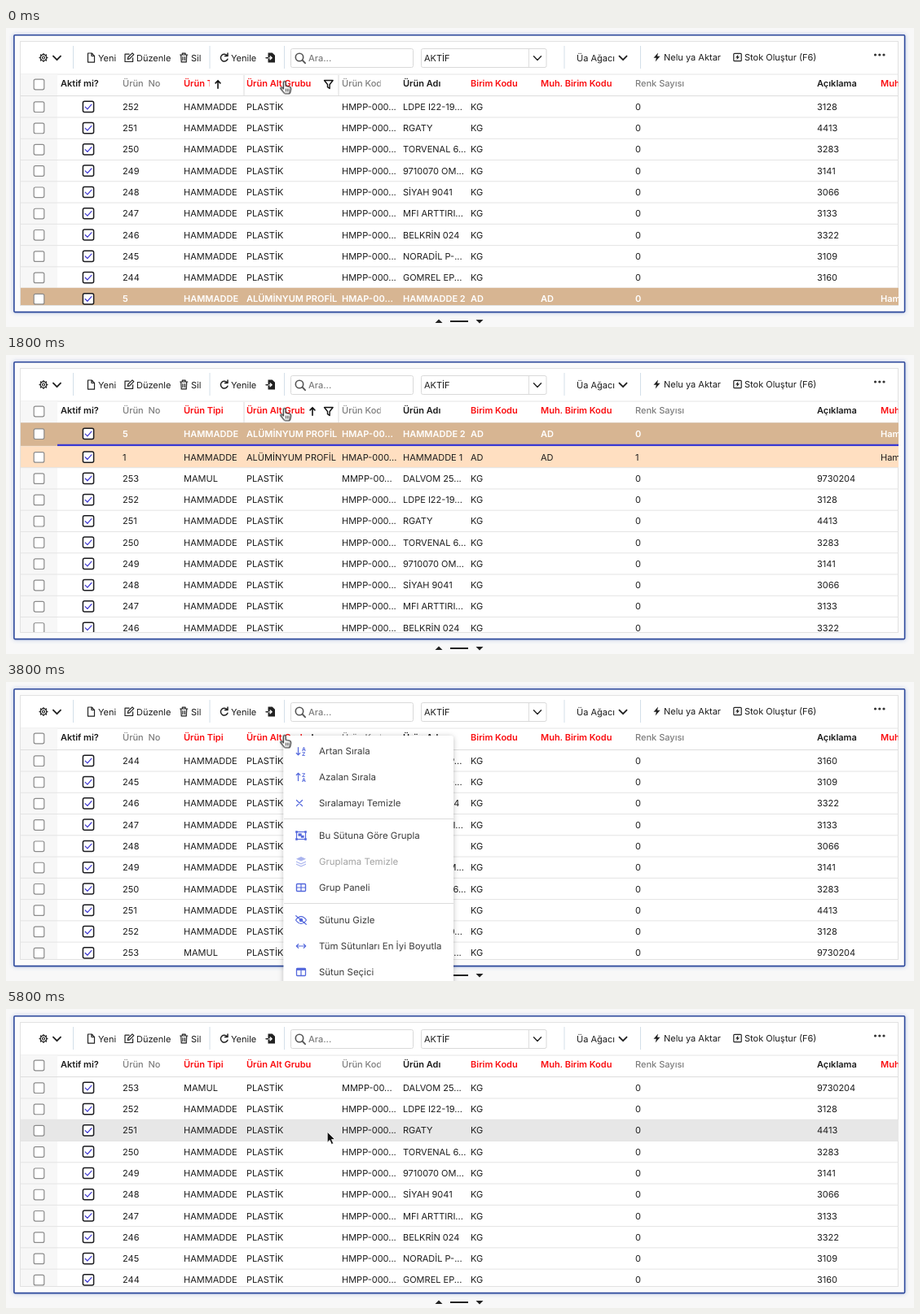
Recreate the animation shown at these times as an HTML page. Size 1114 by 368 pixels, loop 6 s.

```html
<!DOCTYPE html>
<html lang="tr">
<head>
<meta charset="utf-8">
<title>Ürün listesi</title>
<style>
html, body { margin: 0; width: 100%; height: 100%; overflow: hidden; background: #f8f8f8; }
svg { display: block; width: 1114px; height: 368px; }
text { font: 400 11px Inter, Roboto, sans-serif; fill: #1c1c1c; white-space: pre; text-rendering: geometricPrecision; }
.bold { font-weight: 600; }
.red { fill: #fa0d10; font-weight: 600; }
.gray { fill: #7d7d7d; font-weight: 500; }
.picked { fill: #fff; font-weight: 600; }
.menu text { font-size: 11.45px; fill: #3c3c3c; }
.menu text.off { fill: #a3a3a3; }
.ink { fill: none; stroke: #222; stroke-width: 1.2; stroke-linecap: round; stroke-linejoin: round; }
.blue { fill: none; stroke: #5468dc; stroke-width: 1.2; stroke-linecap: round; stroke-linejoin: round; }
.anim { animation: 6s step-end infinite; opacity: 0; }
#byType { animation-name: byType; }
#rising { animation-name: rising; }
#falling { animation-name: falling; }
#plain { animation-name: plain; }
#headHover { animation-name: headHover; }
#menu { animation-name: menu; }
#rowHover, #arrow { animation-name: after; }
#hand { animation-name: hand; }
@keyframes byType { 0% { opacity: 1 } 6.666%, 100% { opacity: 0 } }
@keyframes rising { 0% { opacity: 0 } 6.666% { opacity: 1 } 36.666%, 100% { opacity: 0 } }
@keyframes falling { 0% { opacity: 0 } 36.666% { opacity: 1 } 90%, 100% { opacity: 0 } }
@keyframes plain { 0% { opacity: 0 } 90%, 100% { opacity: 1 } }
@keyframes headHover { 0% { opacity: 1 } 60%, 100% { opacity: 0 } }
@keyframes menu { 0% { opacity: 0 } 60% { opacity: 1 } 86.666%, 100% { opacity: 0 } }
@keyframes after { 0% { opacity: 0 } 86.666%, 100% { opacity: 1 } }
@keyframes hand {
  0% { opacity: 1; transform: translate(341.7px, 65.5px) }
  70% { opacity: 1; transform: translate(342px, 84px) }
  73.333% { opacity: 1; transform: translate(367px, 135px) }
  76.666% { opacity: 1; transform: translate(391.5px, 149.5px) }
  83.333% { opacity: 1; transform: translate(394.5px, 152.5px) }
  86.666%, 100% { opacity: 0; transform: translate(394.5px, 152.5px) }
}
</style>
</head>
<body>
<svg id="stage" viewBox="0 0 1114 368"></svg>
<script>
const text = (x, mid, s, cls = '') => `<text x="${x}" y="${mid + 4}" class="${cls}">${s}</text>`;
const rect = (x, y, w, h, fill, extra = '') => `<rect x="${x}" y="${y}" width="${w}" height="${h}" fill="${fill}" ${extra}/>`;
const path = (d, cls = 'ink', extra = '') => `<path d="${d}" class="${cls}" ${extra}/>`;
const solid = (d, fill = '#222') => `<path d="${d}" fill="${fill}"/>`;
const at = (x, y, body) => `<g transform="translate(${x} ${y})">${body}</g>`;
const group = (id, body) => `<g id="${id}" class="anim">${body}</g>`;
const chevron = (x, y, w = 1.9) => path(`M${x - 4.5} ${y - 2.2}l4.5 4.6 4.5-4.6`, 'ink', `style="stroke-width:${w}"`);
const bolt = 'M1.5-5.5L-4 .8H-.7L-1.8 5.5 4-1.2H.6Z';

// Table
const TOP = 83.7, PITCH = 26.27, HEAD = 67.6;
const stock = [
  [253, 'DALVOM 25...', 9730204], [252, 'LDPE I22-19...', 3128], [251, 'RGATY', 4413],
  [250, 'TORVENAL 6...', 3283], [249, '9710070 OM...', 3141], [248, 'SİYAH 9041', 3066],
  [247, 'MFI ARTTIRI...', 3133], [246, 'BELKRİN 024', 3322], [245, 'NORADİL P-...', 3109],
  [244, 'GOMREL EP...', 3160]
].map(([no, name, note]) => ({
  no, name, note, type: no === 253 ? 'MAMUL' : 'HAMMADDE', sub: 'PLASTİK',
  code: no === 253 ? 'MMPP-00...' : 'HMPP-000...', unit: 'KG', unit2: '', colors: 0, last: ''
}));
const profile = (no, code, name, colors) => ({
  no, code, name, colors, note: '', type: 'HAMMADDE', sub: 'ALÜMİNYUM PROFİL', unit: 'AD', unit2: 'AD', last: 'Hammadde'
});
const five = profile(5, 'HMAP-00...', 'HAMMADDE 2', 0);
const one = profile(1, 'HMAP-000...', 'HAMMADDE 1', 1);
const columns = { no: 143, type: 218, sub: 295, code: 412, name: 487, unit: 570, unit2: 656, colors: 772, note: 995, last: 1073 };

const box = (x, y) => rect(x - 6.3, y - 6.3, 12.6, 12.6, '#fff', 'rx="2" stroke="#8b8b8b" stroke-width="1.2"');
const tick = (x, y) => rect(x - 6.6, y - 6.6, 13.2, 13.2, '#fff', 'rx="2" stroke="#1b1b1f" stroke-width="1.5"')
  + path(`M${x - 3.8} ${y + .2}l2.7 2.7 5-5.6`, 'ink', 'style="stroke:#3c35cf"');

function row(item, i, shift) {
  const y = TOP + PITCH * i + (i ? shift : 0), mid = y + 13.2;
  const h = PITCH + (i ? 0 : shift);
  let out = '';
  if (item === five) out += rect(18, y - .3, 1077, h + .3, '#d7b592');
  else if (item === one) out += rect(18, y, 1077, h, '#ffdfc1');
  out += rect(18, y + h - .5, 1077, 1, '#e4e4e4');
  if (item === five && shift) out += rect(63, y + h - 2.6, 1032, 2.4, '#3a39d2');
  out += box(40.5, mid + .3) + tick(101, mid);
  for (const key in columns) out += text(columns[key], mid, item[key], item === five ? 'picked' : '');
  return out;
}
const rows = (list, shift = 0) => list.map((item, i) => row(item, i, shift)).join('');

const sortArrow = (x, dir) => at(x, 69.5, `<g transform="scale(1 ${dir})">`
  + path('M0 4.8V-4.2M-2.9-1.6L0-4.8 2.9-1.6', 'ink', 'style="stroke:#111;stroke-width:1.6"') + '</g>');
// A sorted heading is cut short to make room for its arrow.
const heading = (x, edge, s, dir) => dir
  ? `<g clip-path="url(#cut${edge})">${text(x, HEAD, s, 'red')}</g>` + sortArrow(edge - 32, dir)
  : text(x, HEAD, s, 'red');
const view = (id, list, typeDir, subDir, shift) => group(id,
  rows(list, shift) + heading(218, 292, 'Ürün Tipi', typeDir) + heading(295, 408, 'Ürün Alt Grubu', subDir));

const fixedHeads = box(40.5, 69.5)
  + text(67, HEAD, 'Aktif mi?', 'bold') + text(143, HEAD, 'Ürün  No', 'gray')
  + `<g clip-path="url(#cutCode)">${text(412, HEAD, 'Ürün Kodu', 'gray')}</g>`
  + text(487, HEAD, 'Ürün Adı', 'bold') + text(570, HEAD, 'Birim Kodu', 'red')
  + text(656, HEAD, 'Muh. Birim Kodu', 'red') + text(772, HEAD, 'Renk Sayısı', 'gray')
  + text(995, HEAD, 'Açıklama', 'bold') + text(1073, HEAD, 'Muh. Kodu', 'red');

const headHover = group('headHover', rect(291.5, 58, 1, 25, '#dcdcdc') + rect(407.5, 58, 1, 25, '#dcdcdc')
  + path('M390.5 64.5h10.6l-4 5v5l-2.6-1.8v-3.2z', 'ink', 'style="stroke:#111;stroke-width:1.4"'));

// Toolbar
const teeth = Array.from({ length: 8 }, (_, i) => `<path d="M0-4V-4.8" class="ink" style="stroke-width:1.5" transform="rotate(${i * 45})"/>`).join('');
const toolbar = [82, 249.5, 341, 684.5, 778].map(x => rect(x, 22, 1, 28, '#d3dfe9')).join('')
  + at(46, 36.5, `<circle r="3.8" class="ink"/><circle r="1.5" class="ink"/>${teeth}`)
  + chevron(62.5, 36.8)
  + path('M100.5 31h4.7l3.3 3.3v7.8h-8zM105 31v3.5h3.5') + text(113, 36.5, 'Yeni')
  + path('M151 32.2h-5v9.3h9.6v-4.6M149.3 38.3l.5-2.3 5.2-5.2 1.8 1.8-5.2 5.2z') + text(160, 36.5, 'Düzenle')
  + path('M213.6 33h9.2M216.3 32.8v-1.7h3.8v1.7M214.7 33.3l.5 8.6h6l.5-8.6M217 35.5v4M219.4 35.5v4') + text(227, 36.5, 'Sil')
  + path('M271.5 34.2a4.4 4.4 0 1 0 .4 4M272 31v3.5h-3.5', 'ink', 'style="stroke-width:1.5"') + text(276, 36.5, 'Yenile')
  + solid('M321.5 30.5h5.2l3.3 3.3v8.6h-8.5z') + path('M319.5 36.8h6.5M324 34.8l2.2 2-2.2 2', 'ink', 'style="stroke:#fff;stroke-width:1.2"')
  + path('M319 36.8h2.5', 'ink', 'style="stroke-width:1.4"')
  + rect(349.5, 25.5, 150, 23, '#fff', 'rx="2" stroke="#d9d9d9"')
  + '<circle cx="360" cy="36" r="4.7" class="ink" style="stroke:#555;stroke-width:1.6"/>'
  + path('M363.6 39.6l3.4 3.6', 'ink', 'style="stroke:#555;stroke-width:1.9"')
  + text(371, 36.5, 'Ara...', 'gray')
  + rect(509.5, 25.5, 153.5, 23, '#fff', 'rx="2" stroke="#d9d9d9"') + rect(641, 26, 1, 22, '#dedede')
  + text(513, 36.5, 'AKTİF') + chevron(652, 37, 1.4)
  + text(700, 36.5, 'Üa Ağacı') + chevron(757, 36.8)
  + at(798.5, 36, solid(bolt)) + text(807, 36.3, 'Nelu ya Aktar')
  + at(897.5, 36, rect(-4.7, -4.7, 9.4, 9.4, 'none', 'rx="1" stroke="#222" stroke-width="1.2"') + `<g transform="scale(.62)">${solid(bolt)}</g>`)
  + text(906, 36.3, 'Stok Oluştur (F6)')
  + [1066.5, 1071.8, 1077].map(x => `<circle cx="${x}" cy="33" r="1.6" fill="#333"/>`).join('');

// Context menu
const letter = (y, s) => `<text x="1" y="${y}" style="font-size:6.5px;font-weight:700;fill:#5468dc">${s}</text>`;
const pen = d => path(d, 'blue');
const icons = {
  down: pen('M-3.5-4.5v9M-5.7 2.5l2.2 2.3 2.2-2.3') + letter(-.5, 'A') + letter(5.5, 'Z'),
  up: pen('M-3.5 4.5v-9M-5.7-2.5l2.2-2.3 2.2 2.3') + letter(-.5, 'Z') + letter(5.5, 'A'),
  clear: pen('M-5.5-3.5l7 7M1.5-3.5l-7 7'),
  group: rect(-5.5, -4.5, 11, 9, 'none', 'stroke="#5468dc" stroke-width="1.2"')
    + [[-6.8, -5.8], [4.2, -5.8], [-6.8, 3.2], [4.2, 3.2]].map(p => rect(p[0], p[1], 2.6, 2.6, '#5468dc')).join('')
    + rect(-3.5, -2.7, 4.2, 3.4, '#5468dc') + rect(-.2, -.2, 3.8, 3, '#5468dc'),
  layers: solid('M0-6l6 2.8-6 2.8-6-2.8z', '#aab4ee') + solid('M-6-.5L0 2.3 6-.5v1.3L0 3.6-6 .8z', '#aab4ee')
    + solid('M-6 2.5L0 5.3l6-2.8v1.3L0 6.6l-6-2.8z', '#aab4ee'),
  panel: rect(-5.5, -4.5, 11, 9, 'none', 'rx="1" stroke="#5468dc" stroke-width="1.4"') + pen('M0-4.5v9M-5.5 0h11'),
  hide: pen('M-6.5 0Q-3.5-4.4 0-4.4T6.5 0Q3.5 4.4 0 4.4T-6.5 0zM-6.3-5.3L6.3 5.3') + '<circle r="2.3" fill="#5468dc"/>',
  fit: pen('M-5.5 0h11M-3.3-2.4L-5.7 0l2.4 2.4M3.3-2.4L5.7 0 3.3 2.4'),
  chooser: rect(-5.5, -4.5, 11, 9, 'none', 'rx="1" stroke="#5468dc" stroke-width="1.3"') + rect(-5.5, -4.5, 11, 2.4, '#5468dc') + pen('M0-4v8.5')
};
const items = [
  [85, 'down', 'Artan Sırala'], [117, 'up', 'Azalan Sırala'], [149, 'clear', 'Sıralamayı Temizle'],
  [189, 'group', 'Bu Sütuna Göre Grupla'], [221, 'layers', 'Gruplama Temizle'], [253, 'panel', 'Grup Paneli'],
  [293, 'hide', 'Sütunu Gizle'], [325, 'fit', 'Tüm Sütunları En İyi Boyutla'], [357, 'chooser', 'Sütun Seçici']
];
const menu = group('menu', '<g class="menu">'
  + rect(340.5, 66, 208.5, 320, '#fff', 'rx="4" filter="url(#soft)"')
  + rect(341, 168, 208, 1, '#dcdcdc') + rect(341, 272, 208, 1, '#dcdcdc')
  + items.map(([y, icon, label]) => at(362, y, icons[icon]) + text(384, y, label, icon === 'layers' ? 'off' : '')).join('')
  + '</g>');

// Pointers, with their tips at 0,0
const hand = group('hand', '<path fill="#fff" stroke="#111" stroke-width="1.1" stroke-linejoin="round" d="M-1.4 8.3V1.4a1.4 1.4 0 0 1 2.8 0V5.8l4.6 1q2 .5 1.8 2.4l-.6 3.4q-.3 2.6-2.2 2.6H1q-1.2 0-2-1.2l-3.6-4.6q-.8-1.4.6-1.9 1-.3 2.6 2z"/>'
  + path('M1.4 9.5v3M3.4 9.5v3M5.3 9.5v3', 'ink', 'style="stroke-width:.8"'));
const arrow = group('arrow', at(394.2, 151.3,
  '<path fill="#111" stroke="#fff" stroke-width=".8" d="M0 0v13l3-2.8 2.2 5 2.3-1-2.2-4.9h4.1z"/>'));

const clip = (id, x, y, w, h) => `<clipPath id="${id}">${rect(x, y, w, h, '#000')}</clipPath>`;
const defs = '<defs>'
  + clip('grid', 18, 57, 1076.5, 284) + clip('cut292', 200, 57, 50, 26)
  + clip('cut408', 280, 57, 86, 26) + clip('cutCode', 400, 57, 59.5, 26)
  + '<filter id="soft" x="-10%" y="-10%" width="120%" height="120%"><feDropShadow dx="0" dy="1" stdDeviation="3" flood-color="#000" flood-opacity=".25"/></filter>'
  + '<filter id="glow" x="-2%" y="-5%" width="104%" height="110%"><feDropShadow dx="0" dy="0" stdDeviation="2.5" flood-color="#4a68c0" flood-opacity=".42"/></filter>'
  + '</defs>';

const newest = stock, oldest = [...stock].reverse();
document.getElementById('stage').innerHTML = defs
  + rect(9.9, 8.8, 1092.7, 340.8, '#fbfbfb', 'rx="1" stroke="#2f4a9c" stroke-width="1.6" filter="url(#glow)"')
  + rect(17.5, 16.5, 1077, 325, '#fff', 'stroke="#e2e2e2"')
  + toolbar + rect(18, 56.5, 1076, 1, '#e6e6e6')
  + '<g clip-path="url(#grid)">'
  + rect(18, 57, 45, 285, '#f7f7f7') + rect(18, 83, 1077, 1, '#dedede')
  + group('rowHover', rect(18, TOP + 2 * PITCH, 1077, PITCH, '#e7e7e7'))
  + fixedHeads
  + view('byType', [...newest.slice(1), five], 1, 0, 0)
  + view('rising', [five, one, ...newest.slice(0, 8)], 0, 1, 2.4)
  + view('falling', oldest, 0, -1, 0)
  + view('plain', newest, 0, 0, 0)
  + headHover + '</g>'
  + solid('M526.5 363l4.5-4.5 4.5 4.5z') + rect(545, 360, 22, 2, '#222') + solid('M576.5 359h9l-4.5 4.5z')
  + menu + hand + arrow;
</script>
</body>
</html>
```
